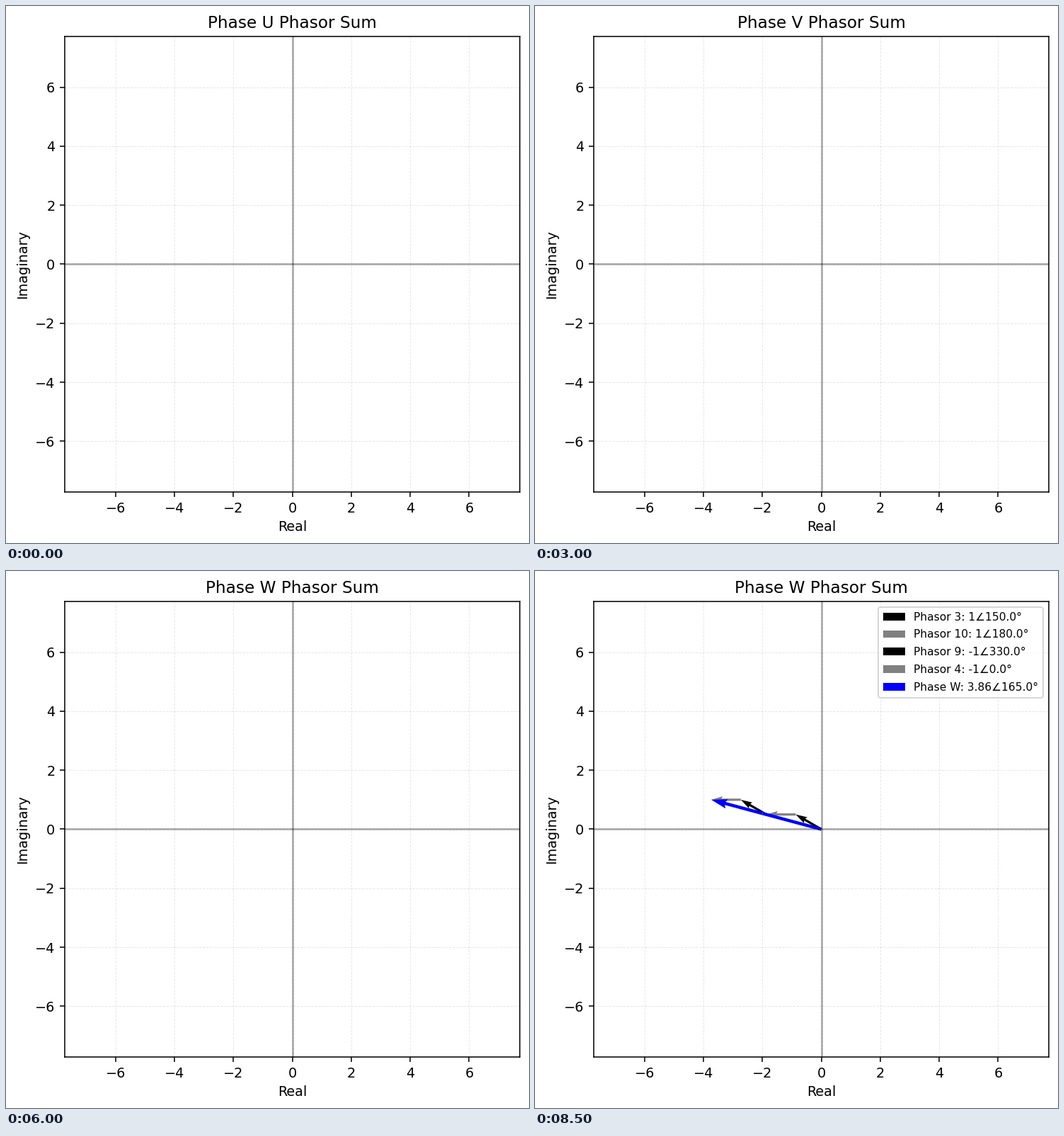
Recreate the animation shown at these times as a matplotlib script. Size 739 by 758 pixels, loop 9000 ms.

```python
import numpy as np
import matplotlib.pyplot as plt
from matplotlib.animation import FuncAnimation

W, H, DPI = 739, 758, 139
LEFT, BOTTOM, SIDE = 82.8, 71.8, 643.4
STEPS = 6  # empty plot, four phasors, resultant

# phase -> (phasor number, sign, angle label) in order of drawing
PHASES = {
    "U": [(1, -1, "90"), (8, -1, "120.0"), (7, 1, "270.0"), (2, 1, "300.0")],
    "V": [(5, -1, "210.0"), (12, -1, "240.0"), (11, 1, "30.0"), (6, 1, "60.0")],
    "W": [(3, 1, "150.0"), (10, 1, "180.0"), (9, -1, "330.0"), (4, -1, "0.0")],
}
NAMES = list(PHASES)


def vector(sign, angle):
    return sign * np.exp(1j * np.radians(float(angle)))


LIMIT = 2 * abs(sum(vector(s, a) for _, s, a in PHASES["U"]))

# the tiny margin keeps the pixel size from being truncated
fig = plt.figure(figsize=((W + 1e-6) / DPI, (H + 1e-6) / DPI), dpi=DPI,
                 facecolor="white")
ax = fig.add_axes([LEFT / W, BOTTOM / H, SIDE / W, SIDE / H])


def arrow(start, vec, color, width, label):
    ax.quiver(start.real, start.imag, vec.real, vec.imag, angles="xy",
              scale_units="xy", scale=1, color=color, width=width, label=label)


def setup(name):
    ax.clear()
    ax.set_xlim(-LIMIT, LIMIT)
    ax.set_ylim(-LIMIT, LIMIT)
    ax.axhline(0, color="black", alpha=0.3, linewidth=1.5)
    ax.axvline(0, color="black", alpha=0.3, linewidth=1.5)
    ax.grid(True, linestyle="--", linewidth=0.5, alpha=0.3)
    ax.set_xlabel("Real")
    ax.set_ylabel("Imaginary")
    ax.set_title(f"Phase {name} Phasor Sum")


def update(i):
    phase, step = divmod(i, STEPS)
    name = NAMES[phase]
    setup(name)
    tip = 0j
    for k, (num, sign, angle) in enumerate(PHASES[name][:step]):
        vec = vector(sign, angle)
        arrow(tip, vec, "gray" if k % 2 else "black", 0.005,
              f"Phasor {num}: {sign}∠{angle}°")
        tip += vec
    if step == STEPS - 1:
        deg = np.degrees(np.angle(tip))
        arrow(0j, tip, "blue", 0.007, f"Phase {name}: {abs(tip):.2f}∠{deg:.1f}°")
    if step:
        ax.legend(loc="upper right", fontsize=8, labelspacing=0.63, borderpad=0.46)
    return []


anim = FuncAnimation(fig, update, frames=STEPS * len(NAMES), interval=500,
                     init_func=lambda: update(0), repeat=True, repeat_delay=0)
plt.show()
```
